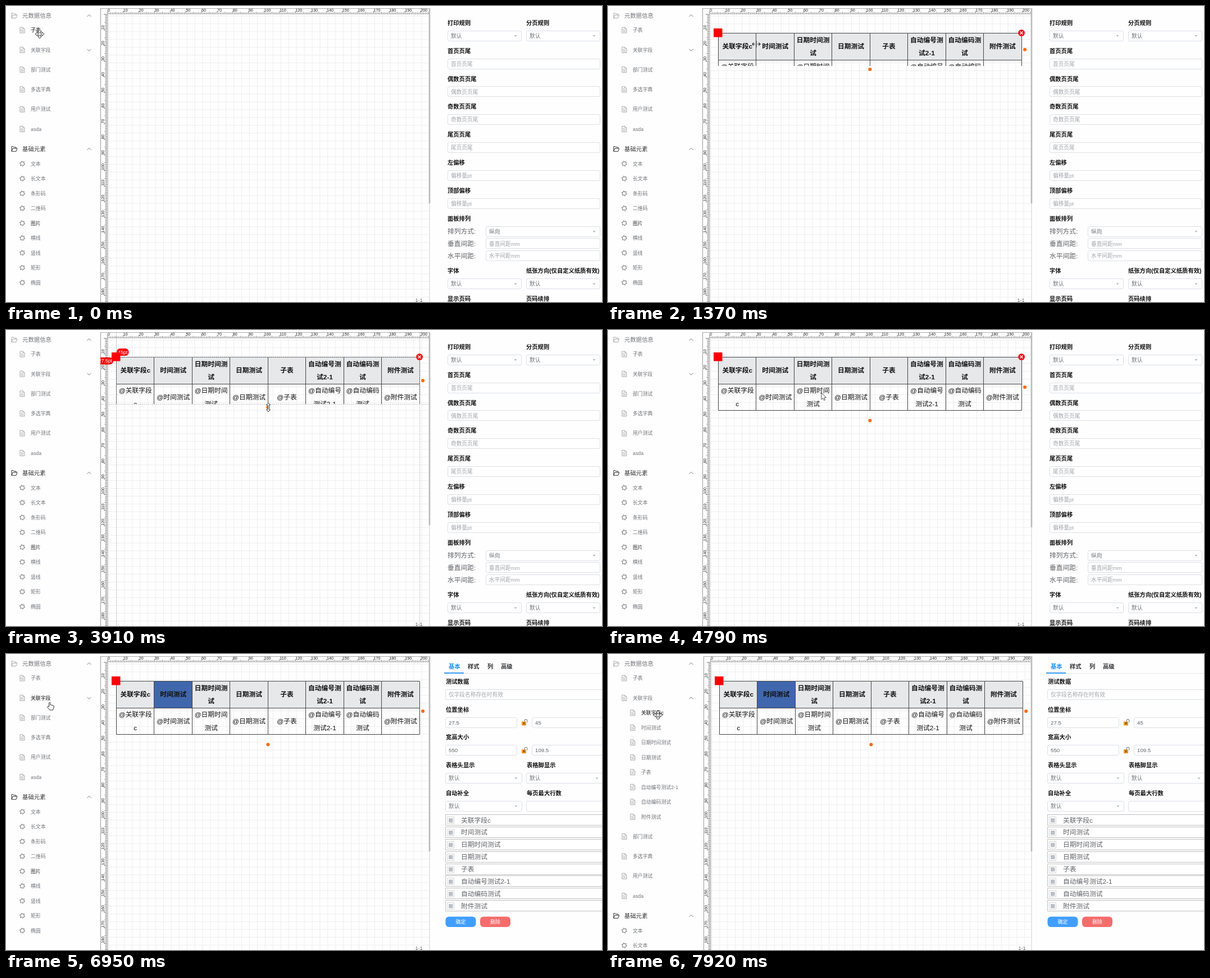
Animation of 1061x528 px, one loop 8000 ms. Source, as an HTML page with a canvas:

```html
<!DOCTYPE html>
<html lang="zh">
<head>
<meta charset="utf-8">
<title>打印设计器</title>
<style>
html, body { margin: 0; width: 100%; height: 100%; overflow: hidden; background: #fff; }
canvas { display: block; width: 1061px; height: 528px; }
</style>
</head>
<body>
<canvas id="stage" width="1061" height="528"></canvas>
<script>
const ctx = document.getElementById('stage').getContext('2d');
const W = 1061, H = 528, LOOP = 8000, MM = 2.785;
const FONT = '"Liberation Sans", "Noto Sans CJK SC", "Noto Sans CJK", sans-serif';
const INK = '#303133', SOFT = '#737579', BORDER = '#dcdfe6', HINT = '#a2a5ab', RED = '#fb0007';

// time, cursor kind, cursor x, y, and what changes from there on
const STEPS = [
  { t: 0, cur: 'move', x: 60, y: 50, hover: '子表' },
  { t: 220, cur: 'move', x: 180, y: 32, hover: '', table: [112, 13] },
  { t: 520, x: 270.5, y: 59, table: [202.5, 40.5] },
  { t: 820, x: 268, y: 144, table: [200.5, 125.5] },
  { t: 1100, x: 265, y: 80, table: [197.5, 61.5] },
  { t: 1370, cur: 'col', x: 264, y: 68, table: [196.5, 48.5], box: 58.5, close: true },
  { t: 1670, cur: 'arrow', x: 318, y: 88 },
  { t: 1950, x: 420, y: 110 },
  { t: 2230, cur: 'row', x: 466, y: 113 },
  { t: 2510, guides: true, box: 61, y: 116 },
  { t: 2800, box: 66, y: 121 },
  { t: 3080, box: 71, y: 126 },
  { t: 3370, box: 76, y: 131 },
  { t: 3640, box: 80, y: 135 },
  { t: 3910, box: 83.5, x: 467, y: 138 },
  { t: 4210, box: 96, y: 151 },
  { t: 4510, box: 107, y: 161 },
  { t: 4790, guides: false, cur: 'arrow', x: 380, y: 112 },
  { t: 5100, x: 268, y: 62, panel: 2, picked: true },
  { t: 5400 },
  { t: 5730, x: 252, y: 66 },
  { t: 6030, x: 205, y: 74 },
  { t: 6330, x: 140, y: 82, close: false },
  { t: 6620, cur: 'hand', x: 98, y: 80, hover: '关联字段' },
  { t: 6950, x: 78, y: 86 },
  { t: 7290, open: true, shift: 2 },
  { t: 7600, x: 82, y: 92 },
  { t: 7920, cur: 'move', x: 89, y: 109, hover: '关联字段c' }
];

const FIELDS = ['关联字段c', '时间测试', '日期时间测试', '日期测试', '子表', '自动编号测试2-1', '自动编码测试', '附件测试'];
const HEADS = ['关联字段c', '时间测试', '日期时间测|试', '日期测试', '子表', '自动编号测|试2-1', '自动编码测|试', '附件测试'];
const CELLS = ['@关联字段|c', '@时间测试', '@日期时间|测试', '@日期测试', '@子表', '@自动编号|测试2-1', '@自动编码|测试', '@附件测试'];
const BASICS = ['文本', '长文本', '条形码', '二维码', '图片', '横线', '竖线', '矩形', '椭圆'];

function text(s, x, y, size, color = INK, bold = false, align = 'left') {
  ctx.font = `${bold ? 'bold ' : ''}${size}px ${FONT}`;
  ctx.fillStyle = color;
  ctx.textAlign = align;
  ctx.fillText(s, x, y + size * 0.36);
}
function path(points, color, width = 1, close = false, fill = null) {
  ctx.beginPath();
  points.forEach(([x, y], i) => i ? ctx.lineTo(x, y) : ctx.moveTo(x, y));
  if (close) ctx.closePath();
  if (fill) { ctx.fillStyle = fill; ctx.fill(); }
  if (color) { ctx.strokeStyle = color; ctx.lineWidth = width; ctx.stroke(); }
}
const line = (x1, y1, x2, y2, color, width = 1) => path([[x1, y1], [x2, y2]], color, width);
const snap = v => Math.floor(v) + .5;
function rect(x, y, w, h, fill, stroke, r = 0) {
  ctx.beginPath();
  ctx.roundRect(x, y, w, h, r);
  if (fill) { ctx.fillStyle = fill; ctx.fill(); }
  if (stroke) { ctx.strokeStyle = stroke; ctx.lineWidth = 1; ctx.stroke(); }
}
function dot(x, y, r, fill) {
  ctx.beginPath();
  ctx.arc(x, y, r, 0, Math.PI * 2);
  ctx.fillStyle = fill;
  ctx.fill();
}
function at(x, y, draw) {
  ctx.save();
  ctx.translate(x, y);
  draw();
  ctx.restore();
}
function clipTo(x, y, w, h) {
  ctx.beginPath();
  ctx.rect(x, y, w, h);
  ctx.clip();
}

// Sidebar
const chevron = (y, up) => path([[144.5, y + (up ? 2 : -1.5)], [148, y + (up ? -1.5 : 2)], [151.5, y + (up ? 2 : -1.5)]], '#777');
function folder(y, color) {
  at(9, y - 5, () => {
    path([[1, 9.5], [1, .8], [4, .8], [5.2, 2.2], [9, 2.2], [9, 4]], color);
    path([[1, 9.5], [3, 4.2], [11, 4.2], [9, 9.5]], color, 1, true);
  });
}
function doc(x, y) {
  at(x - 4.5, y - 5.5, () => {
    path([[.5, .5], [5.5, .5], [8.5, 3.5], [8.5, 10.5], [.5, 10.5]], '#a0a0a0', .9, true);
    path([[5.5, .5], [5.5, 3.5], [8.5, 3.5]], '#a0a0a0', .8);
    for (const ly of [4.2, 6.2, 8.2]) line(2, ly, ly < 5 ? 4.5 : 7, ly, '#a0a0a0', .8);
  });
}
function gear(x, y) {
  const pts = [];
  for (let i = 0; i < 24; i++) {
    const a = (i + .5) * Math.PI / 12, r = i % 4 < 2 ? 5.2 : 4;
    pts.push([x + r * Math.cos(a), y + r * Math.sin(a)]);
  }
  path(pts, null, 1, true, '#a2a2a2');
  dot(x, y, 2.6, '#fff');
}
function sidebar(s) {
  const tint = name => name === s.hover ? '#111' : SOFT;
  folder(17, '#aaa');
  text('元数据信息', 29, 17, 10.4, SOFT);
  chevron(17, true);
  let y = 43;
  for (const name of ['子表', '关联字段', '部门测试', '多选字典', '用户测试', 'asda']) {
    doc(29, y);
    text(name, 44, y, 8.9, tint(name));
    if (name === '关联字段') {
      chevron(y, s.open);
      if (s.open) {
        FIELDS.forEach((field, i) => {
          doc(44, y + 26.5 * (i + 1));
          text(field, 59, y + 26.5 * (i + 1), 8.9, tint(field));
        });
        y += 212;
      }
    }
    y += 35.3;
  }
  folder(y, INK);
  text('基础元素', 29, y, 10.4, INK);
  chevron(y, true);
  BASICS.forEach((name, i) => {
    const by = y + 26.5 * (i + 1);
    gear(29, by);
    text(name, 44, by, 8.9, name === '图片' ? '#333' : SOFT);
  });
}

// Paper and rulers
function paper() {
  rect(168, 4, 586, 530, '#fefefe');
  for (let i = 1; i < 42; i++) {
    const p = 5 * MM * i;
    line(169 + p, 16, 169 + p, H, '#eeeeee');
    line(181, 4 + p, 754, 4 + p, '#eeeeee');
  }
  for (let i = 0; i <= 205; i++) {
    const p = i * MM, len = i % 10 ? (i % 5 ? 3.5 : 4.5) : 6;
    if (181 + p < 753) line(181 + p, 15 - len, 181 + p, 15, '#666', .9);
    if (15 + p < H) line(181 - len - 1, 15 + p, 181, 15 + p, '#555', .9);
  }
  for (let n = 0; n <= 200; n += 10) {
    text(n, 181 + n * MM, 7.3, 7.2, '#222');
    if (n && n < 190) {
      at(172.5, 14.5 + n * MM, () => {
        ctx.rotate(-Math.PI / 2);
        text(n, 0, 0, 7.2, '#222');
      });
    }
  }
  line(168.5, 4, 168.5, H, '#999');
  line(168, 4.5, 754, 4.5, '#aaa');
  line(181.5, 15, 181.5, H, '#ccc', .7);
  text('1-1', 735, 525, 9, '#666', false, 'center');
}

// Table element
const COL = 67.45, ROW = 47.5, WIDE = COL * 8;
function cell(label, cx, cy, bold) {
  const rows = label.split('|');
  rows.forEach((r, i) => text(r, cx, cy + (i - (rows.length - 1) / 2) * 23.6, 11.75, '#111', bold, 'center'));
}
function table(s) {
  const [x, y] = s.table;
  ctx.save();
  clipTo(x - 1, y - 1, WIDE + 2, s.box ? s.box + 1 : 100);
  rect(x, y, WIDE, ROW, '#e7e8ea');
  if (s.picked) rect(x + COL, y, COL, ROW, '#4066ad');
  for (let i = 0; i <= 8; i++) {
    const lx = snap(x + i * COL);
    line(lx, y, lx, y + ROW * 2, '#444');
  }
  for (let i = 0; i <= 2; i++) {
    const ly = snap(y + i * ROW);
    line(x, ly, x + WIDE, ly, '#444');
  }
  for (let i = 0; i < 8; i++) {
    const cx = x + COL * (i + .5);
    cell(HEADS[i], cx, y + ROW / 2, true);
    cell(CELLS[i], cx, y + ROW * 1.5, false);
  }
  ctx.restore();
  if (s.box) handles(s, x, y);
}
function handles(s, x, y) {
  const bottom = y + s.box, right = x + WIDE;
  if (s.guides) {
    ctx.setLineDash([2, 1.5]);
    for (const gx of [x, right]) line(snap(gx), 5, snap(gx), H, '#aaa', .8);
    for (const gy of [y, bottom]) line(169, snap(gy), 754, snap(gy), '#aaa', .8);
    ctx.setLineDash([]);
    rect(197, 33, 21.5, 13, RED, null, 6);
    text('45pt', 207.8, 39.5, 8.8, '#fff', false, 'center');
    ctx.save();
    clipTo(168, 40, 40, 30);
    rect(160, 49, 31, 12.5, RED, null, 6);
    text('27.5pt', 189, 55.3, 8.8, '#fff', false, 'right');
    ctx.restore();
  }
  rect(x - 8.5, y - 8.5, 15.5, 15.5, RED);
  dot(right + 6, y + s.box / 2, 3, '#ff6a00');
  dot(x + WIDE / 2, bottom + 6, 3, '#ff6a00');
  if (s.close) {
    dot(right, y - .5, 6, '#f0141e');
    for (const d of [-1, 1]) line(right - 2.5, y - .5 - 2.5 * d, right + 2.5, y - .5 + 2.5 * d, '#fff', 1.1);
  }
}

// Right panel
const label = (s, x, y) => text(s, x, y, 10.3, '#111', true);
function input(x, right, y, value, color = HINT, pad = 6) {
  rect(x + .5, snap(y - 9), right - x - 1, 18, '#fff', BORDER, 2.5);
  text(value, x + pad, y + .3, 9.7, color);
}
function select(x, right, y, value, arrowX = right - 11) {
  input(x, right, y, value, '#6b6e74');
  path([[arrowX - 2.5, y - 1], [arrowX + 2.5, y - 1], [arrowX, y + 2]], null, 1, true, '#b4b8bf');
}
function pagePanel() {
  label('打印规则', 786, 30.5);
  label('分页规则', 926, 30.5);
  select(786, 918, 53, '默认');
  select(926, 1058, 53, '默认');
  ['首页页尾', '偶数页页尾', '奇数页页尾', '尾页页尾', '左偏移', '顶部偏移'].forEach((name, i) => {
    label(name, 786, 80 + i * 49.8);
    input(786, 1058, 103 + i * 49.8, i < 4 ? name : '偏移量pt');
  });
  label('面板排列', 786, 379);
  ['排列方式:', '垂直间距:', '水平间距:'].forEach((name, i) => {
    const y = 402 + i * 21.8;
    text(name, 786, y, 11.75, '#606266');
    if (i) input(854, 1058, y, name.slice(0, 4) + 'mm');
    else select(854, 1058, y, '纵向');
  });
  label('字体', 786, 472.5);
  label('纸张方向(仅自定义纸质有效)', 926, 472.5);
  select(786, 918, 495.5, '默认');
  select(926, 1058, 495.5, '默认');
  label('显示页码', 786, 522);
  label('页码续排', 926, 522);
}
function padlock(x, y) {
  ctx.beginPath();
  ctx.arc(x + 3, y - 3, 2.3, Math.PI, 0);
  ctx.lineTo(x + 5.3, y);
  ctx.moveTo(x + .7, y - 3);
  ctx.lineTo(x + .7, y);
  ctx.strokeStyle = '#8d8d8d';
  ctx.lineWidth = 1.2;
  ctx.stroke();
  rect(x - 4.5, y - 1.5, 8, 7, '#ee9324', null, 1);
  rect(x - 1.4, y, 1.8, 3.5, '#5b3c14');
}
function elementPanel() {
  line(780, 34.5, W, 34.5, '#e4e7ed');
  [['基本', 788], ['样式', 822], ['列', 857], ['高级', 881]].forEach(([name, x], i) =>
    text(name, x, 22.5, 10.3, i ? INK : '#1e90f5', true));
  rect(780, 33, 35, 1.8, '#1e90f5');
  label('测试数据', 783, 49);
  input(782, 1075, 72, '仅字段名称存在时有效');
  [['位置坐标', '27.5', '45'], ['宽高大小', '550', '109.5']].forEach(([name, a, b], i) => {
    const y = 122 + i * 49.7;
    label(name, 783, y - 23);
    input(782, 910, y, a, '#606266');
    padlock(922.5, y);
    input(936, 1075, y, b, '#606266');
  });
  label('表格头显示', 783, 198.5);
  label('表格脚显示', 927, 198.5);
  select(782, 919, 221.5, '默认');
  select(926, 1075, 221.5, '默认', 1052);
  label('自动补全', 783, 248);
  label('每页最大行数', 927, 248);
  select(782, 919, 271.3, '默认');
  input(926, 1075, 271.3, '');
  FIELDS.forEach((name, i) => {
    const y = 296.4 + i * 21.85;
    rect(782.5, snap(y - 9.7), 300, 19, '#fff', '#bfbfbf');
    rect(785.5, snap(y - 5.7), 12, 12, '#fff', '#d4d4d4');
    rect(788, y - 3.3, 7.5, 7.5, '#bcbfc4');
    text(name, 810, y, 11.75, '#606266');
  });
  rect(782.5, 468.5, 54, 18.5, '#409eff', null, 6);
  rect(844, 468.5, 54, 18.5, '#f56c6c', null, 6);
  text('确定', 809.5, 478, 9, '#fff', false, 'center');
  text('删除', 871, 478, 9, '#fff', false, 'center');
}

// Cursors
const CURSORS = {
  move() {
    const arm = [[-1.3, -1.3], [-1.3, -4.2], [-3.3, -4.2], [0, -8], [3.3, -4.2], [1.3, -4.2]], pts = [];
    for (let q = 0; q < 4; q++) {
      const c = Math.round(Math.cos(q * Math.PI / 2)), n = Math.round(Math.sin(q * Math.PI / 2));
      for (const [x, y] of arm) pts.push([x * c - y * n, x * n + y * c]);
    }
    path(pts, '#333', 1, true, '#fff');
  },
  col() {
    line(0, -6, 0, 6, '#333', 1);
    for (const d of [-1, 1]) {
      line(2 * d, 0, 7 * d, 0, '#222', 1);
      path([[4.5 * d, -2.5], [7 * d, 0], [4.5 * d, 2.5]], '#222', 1.1);
    }
  },
  row() {
    path([[0, -8], [3.5, -4], [1.2, -4], [1.2, 4], [3.5, 4], [0, 8], [-3.5, 4], [-1.2, 4], [-1.2, -4], [-3.5, -4]], '#333', 1, true, '#fff');
  },
  arrow() {
    path([[0, 0], [0, 12], [2.7, 9.5], [4.6, 13.5], [6.5, 12.6], [4.7, 8.8], [8.4, 8.5]], '#222', .8, true, '#fff');
  },
  hand() {
    path([[-1.5, 8], [-1.5, .8], [-.5, 0], [.8, .8], [.8, 5], [2.7, 4.6], [3.2, 5.4], [5, 5.2], [5.4, 6], [7, 6.2], [7.2, 10], [5.5, 14], [0, 14], [-4.5, 8.6], [-3.6, 7.4]], '#333', 1, true, '#fff');
  }
};

function stateAt(t) {
  const s = { panel: 1, shift: 0 };
  for (const step of STEPS) if (step.t <= t) Object.assign(s, step);
  return s;
}
function draw(t) {
  const s = stateAt(t);
  rect(0, 0, W, H, '#fefefe');
  sidebar(s);
  ctx.save();
  if (s.shift) clipTo(168, 0, 586, H);
  ctx.translate(s.shift, 0);
  paper();
  if (s.table) table(s);
  ctx.restore();
  line(754, 4, 754, H, '#dedede', 1.5);
  rect(752.7, 4, 2.6, s.guides ? 344 : 348, '#b9bbbe');
  if (s.panel === 1) pagePanel();
  else elementPanel();
  at(s.x, s.y, CURSORS[s.cur]);
}
function tick() {
  draw(performance.now() % LOOP);
  requestAnimationFrame(tick);
}
tick();
</script>
</body>
</html>
```
